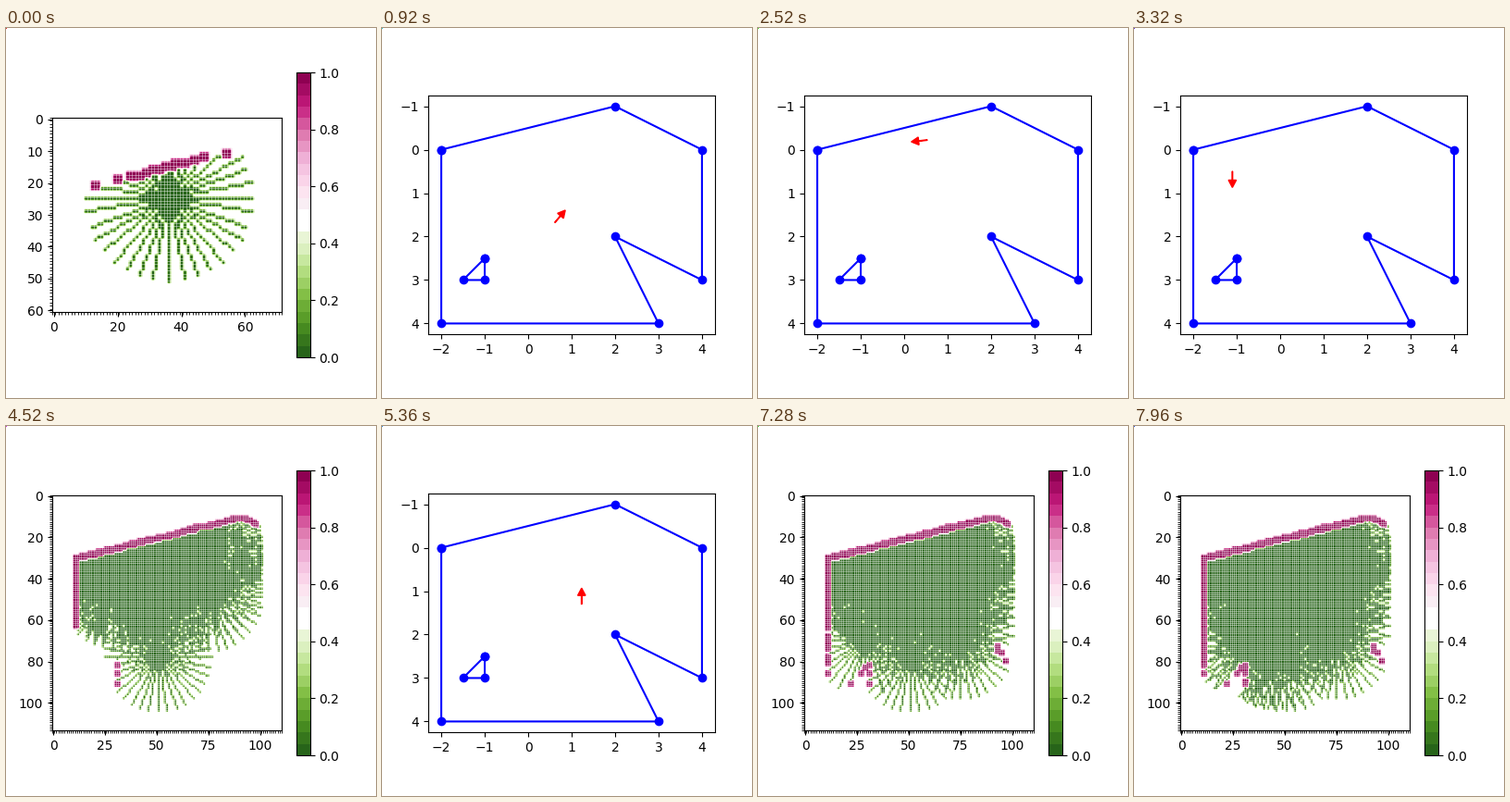
Animation of 400 by 400 pixels, one loop 8 s. Source, as a matplotlib script:

```python
import colorsys

import numpy as np
import matplotlib.pyplot as plt
from matplotlib.animation import FuncAnimation
from matplotlib.cm import ScalarMappable
from matplotlib.colors import ListedColormap, Normalize
from matplotlib.markers import TICKDOWN, TICKLEFT
from matplotlib.patches import Rectangle

FRAMES, INTERVAL = 200, 40
PERIOD, MAP_HOLD = 14, 4            # frames per cycle, of which the map is shown
CELL, MARGIN, REACH = 0.05, 10, 1.3
LEVELS = 25

ROOM = np.array([(-2, 0), (2, -1), (4, 0), (4, 3), (2, 2), (3, 4), (-2, 4), (-2, 0)], float)
BLOCK = np.array([(-1, 2.5), (-1.5, 3), (-1, 3), (-1, 2.5)], float)

# places where the robot stops and the map is shown
STOPS = np.array([
    (0, 0), (0, 2.4), (1.23, 0.95), (1.23, -0.02), (1.23, -0.3),
    (-1.1, -0.04), (-1.1, 0.56), (-1.1, 0.85), (0.2, 1.1), (1.23, 2.1),
    (1.23, 0.1), (0.6, 0.17), (0.6, -0.25), (-1.1, 2.0), (-0.3, 2.35)])
BLIND_LEG = 2                       # no scans while under way

WALL_A = np.vstack([ROOM[:-1], BLOCK[:-1]])
WALL_D = np.vstack([np.diff(ROOM, axis=0), np.diff(BLOCK, axis=0)])


def cross(a, b):
    return a[..., 0] * b[..., 1] - a[..., 1] * b[..., 0]


def cast(pos, deg):
    """Follow one beam; return its end and whether it met a wall."""
    ray = np.array([np.cos(np.radians(deg)), np.sin(np.radians(deg))])
    den = cross(ray, WALL_D)
    den = np.where(np.abs(den) < 1e-9, 1e-9, den)
    dist = cross(WALL_A - pos, WALL_D) / den
    along = cross(WALL_A - pos, ray) / den
    ok = (dist > 0) & (along >= 0) & (along <= 1)
    near = dist[ok].min() if ok.any() else np.inf
    near = np.ceil(near / CELL - 1e-6) * CELL if near <= REACH else np.inf
    hit = near <= REACH + 1e-6
    return pos + ray * (near if hit else REACH), hit


def scan(pos):
    return [(pos, *cast(pos, deg)) for deg in range(0, 360, 10)]


def build_map(beams):
    ends = np.array([end for _, end, _ in beams])
    low = ends.min(axis=0)
    w, h = np.round((ends.max(axis=0) - low) / CELL).astype(int) + 2 * MARGIN
    grid = np.full((h, w), 0.5)

    def to_cell(p):
        return (p - low) / CELL + MARGIN

    for start, end, _ in beams:
        a, b = np.round(to_cell(start)), np.round(to_cell(end))
        n = int(np.abs(b - a).max()) + 1
        cells = np.round(np.linspace(a, b, n)).astype(int)
        grid[cells[:, 1], cells[:, 0]] = 0
    for _, end, hit in beams:
        if hit:
            x, y = np.floor(to_cell(end) + 1e-6).astype(int)
            grid[y:y + 3, x:x + 3] = 1
    return grid


def explore():
    beams = scan(STOPS[0])
    maps = [build_map(beams)]
    for leg in range(1, len(STOPS)):
        a, b = STOPS[leg - 1], STOPS[leg]
        for t in ((1,) if leg == BLIND_LEG else (1 / 3, 2 / 3, 1)):
            beams += scan(a + (b - a) * t)
        maps.append(build_map(beams))
    return maps


maps = explore()

colors = plt.get_cmap("PiYG_r")(np.linspace(0, 1, LEVELS))
colors[LEVELS // 2 - 1:LEVELS // 2 + 1] = 1
cmap = ListedColormap(colors)

fig = plt.figure(figsize=(4, 4), dpi=100)

room_ax = fig.add_subplot(111, label="room")
for shape in (ROOM, BLOCK):
    room_ax.plot(*shape.T, "bo-")
room_ax.set(xlim=(-2.3, 4.3), ylim=(4.25, -1.25), aspect="equal")
room_ax.set_xticks(range(-2, 5))
room_ax.set_yticks(range(-1, 5))

map_ax = fig.add_subplot(111, label="map")
bar = fig.colorbar(ScalarMappable(Normalize(0, 1), cmap), ax=map_ax)

corner = Rectangle((0, 1 - 1 / 400), 1 / 400, 1 / 400, transform=fig.transFigure, lw=0)
fig.add_artist(corner)


def draw_map(grid):
    ax = map_ax
    ax.clear()
    h, w = grid.shape
    ax.imshow(grid, cmap=cmap, vmin=0, vmax=1,
              interpolation="hanning", interpolation_stage="data")
    xs, ys = np.arange(-0.5, w, 1), np.arange(-0.5, h, 1)
    mesh = dict(color="w", lw=0.6, alpha=0.5, snap=True)
    ax.vlines(xs, -0.5, h - 0.5, **mesh)
    ax.hlines(ys, -0.5, w - 0.5, **mesh)
    tick = dict(ls="", color="k", ms=2, mew=0.6, clip_on=False)
    ax.plot(xs, np.full(len(xs), h - 0.5), marker=TICKDOWN, **tick)
    ax.plot(np.full(len(ys), -0.5), ys, marker=TICKLEFT, **tick)
    ax.set(xlim=(-0.5, w - 0.5), ylim=(h - 0.5, -0.5))


def draw_robot(leg, t):
    for patch in list(room_ax.patches):
        patch.remove()
    a, b = STOPS[leg], STOPS[leg + 1]
    x, y = a + (b - a) * t
    dx, dy = (b - a) / np.hypot(*(b - a)) * 0.2
    room_ax.arrow(x, y, dx, dy, width=0.012, head_width=0.18, head_length=0.17,
                  fc="r", ec="r", lw=1)


def update(i):
    cycle, phase = divmod(i, PERIOD)
    show_map = phase < MAP_HOLD
    map_ax.set_visible(show_map)
    bar.ax.set_visible(show_map)
    room_ax.set_visible(not show_map)
    if show_map:
        draw_map(maps[cycle])
    else:
        draw_robot(cycle, (phase - MAP_HOLD) / (PERIOD - MAP_HOLD))
    corner.set_facecolor(colorsys.hsv_to_rgb(i * 0.37 % 1, 0.8, 0.9))
    return []


anim = FuncAnimation(fig, update, frames=FRAMES, interval=INTERVAL,
                     init_func=lambda: [], repeat=True, repeat_delay=0, blit=False)
plt.show()
```
